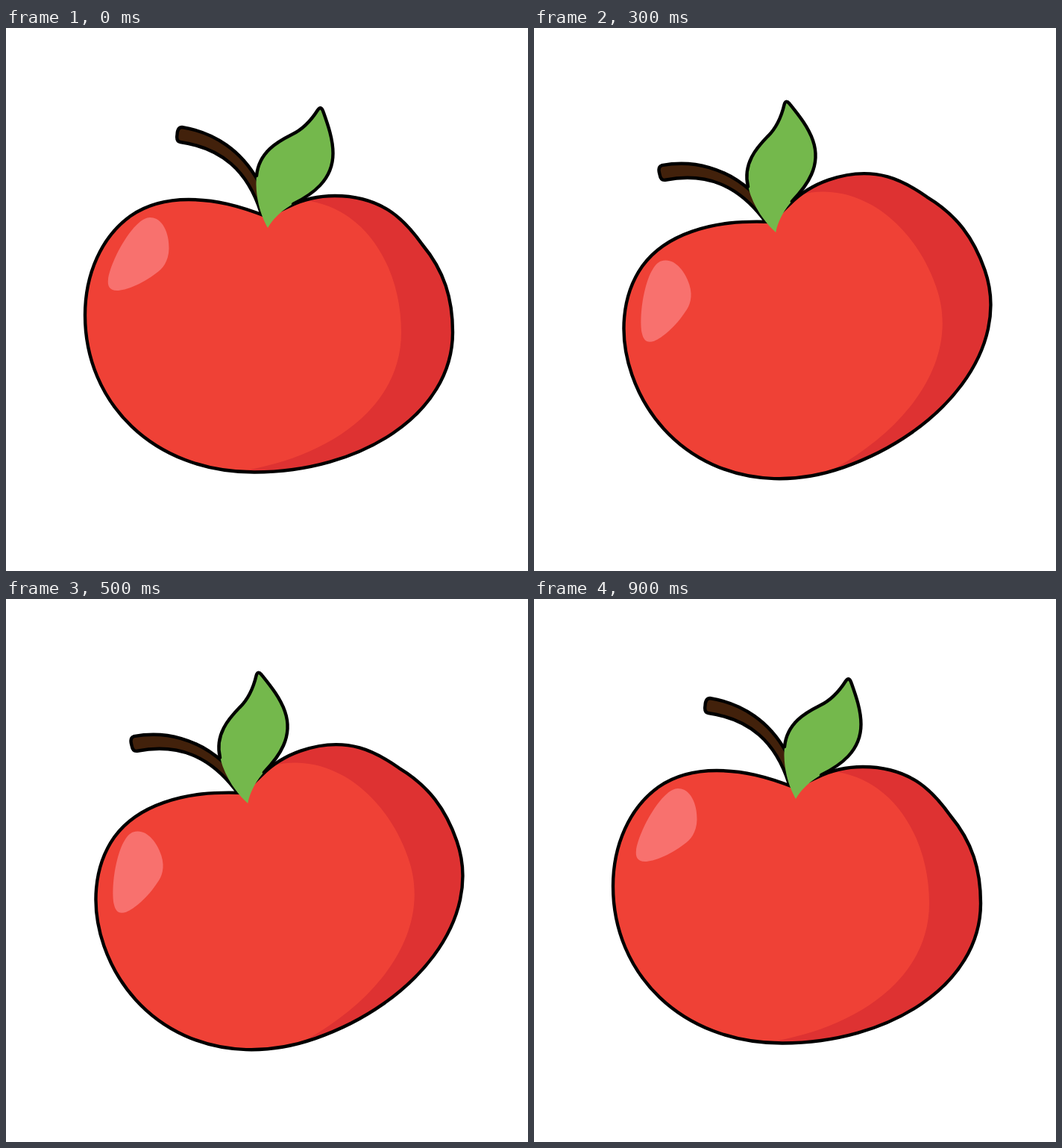
Recreate the animation shown at these times as an HTML page. Size 700 by 728 pixels, loop 1 s.

```html
<!DOCTYPE html>
<html lang="en">
<head>
<meta charset="utf-8">
<title>Rocking apple</title>
<style>
  html, body { margin: 0; width: 100%; height: 100%; overflow: hidden; background: #fff; }
  svg { display: block; width: 100vw; height: 100vh; }
  .line { fill: none; stroke: #000; stroke-width: 4.4; stroke-linejoin: round; stroke-linecap: round; }
</style>
</head>
<body>
<svg viewBox="0 0 700 728">
  <defs>
    <path id="body" d="M350 253 C312 238 280 230 245 230 C215 230 190 236 167 252
      C128 280 106 330 106 385 C106 502 197 595.5 333 595.5 C475 595.5 599 518 599 408
      C599 363 588 326 558 290 C538 262 508 225 441 225 C418 225 398 230 380 239 Z"/>
    <clipPath id="inside"><use href="#body"/></clipPath>
  </defs>
  <g id="apple">
    <use href="#body" fill="#ef4136"/>
    <path clip-path="url(#inside)" fill="#de3232"
      d="M398 231 C479 238 530 318 530 408 C530 509 434 573 322 593 L322 620 H640 V200 H398 Z"/>
    <path fill="#f8716e" d="M193 254 C210 254 219 275 218.5 296 C218 313 210 323 201 329
      C183 343 160 352 149 352 C138 352 136 345 137 337 C141 310 172 254 193 254 Z"/>
    <use href="#body" class="line"/>
    <path class="line" style="fill:#42210b" d="M236 133 C280 140 316 165 338 205 L342 248
      C324 191 289 161 234 153 Q228 152 229.5 143 Q230 133 236 133 Z"/>
    <path fill="#74b84c" d="M335.5 210 C335 170 365 152 383 143 C400 135 411 121 418 110
      Q422 104 425 111 C431 128 438.5 148 438.5 168 C438.5 204 411 223 383 237
      C368 246 358 256 351 268 C344 256 336 235 335.5 210 Z"/>
    <path class="line" d="M336 198 C339 166 365 152 383 143 C400 135 411 121 418 110
      Q422 104 425 111 C431 128 438.5 148 438.5 168 C438.5 204 411 223 385 236"/>
  </g>
</svg>
<script>
  const STEP = 100;
  // Tilt in degrees, held for one step each
  const tilt = [0, -5, -9.9, -19.2, -24, -19.2, -19.2, -9.9, -5, 0];
  const apple = document.getElementById('apple');

  function draw(ms) {
    const i = Math.floor(ms / STEP) % tilt.length;
    apple.setAttribute('transform', `rotate(${tilt[i]} 355 350)`);
  }

  let start;
  function tick(now) {
    start ??= now;
    draw(now - start);
    requestAnimationFrame(tick);
  }
  draw(0);
  requestAnimationFrame(tick);
</script>
</body>
</html>
```
